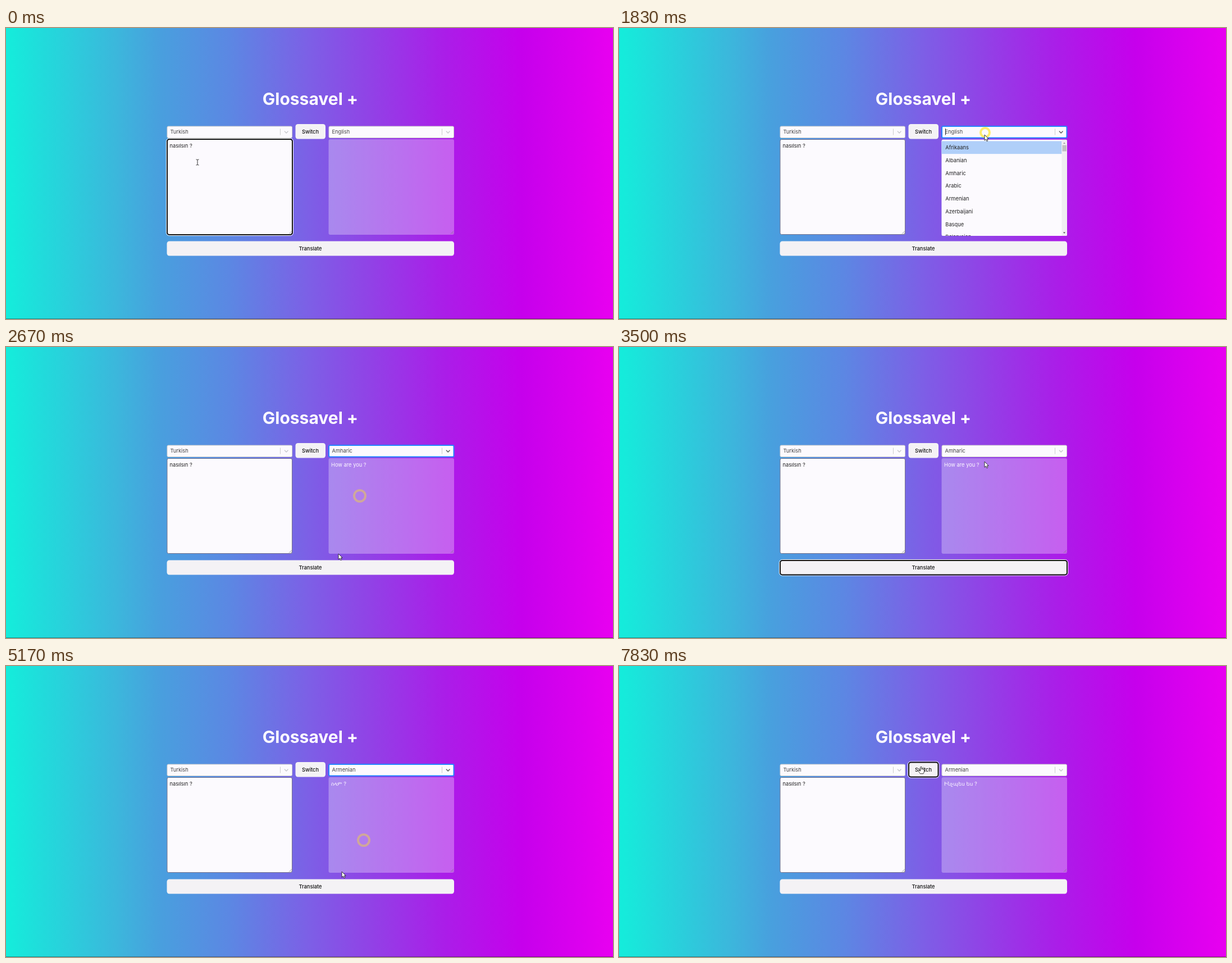
An HTML page that plays this animation: 1081 by 518 pixels, repeating every 8 s.

```html
<!DOCTYPE html>
<html lang="en">
<head>
<meta charset="utf-8">
<title>Translator</title>
<style>
html, body { margin: 0; width: 100%; height: 100%; overflow: hidden; background: #7d5fe6; }
svg { display: block; width: 1081px; height: 518px; }
text { font: 9.3px Inter, "Noto Sans", "DejaVu Sans", sans-serif; fill: #222; }
.title { font-size: 30px; font-weight: 700; fill: #fdfaff; text-anchor: middle; }
.value { fill: #444; }
.label { font-weight: 500; fill: #111; text-anchor: middle; }
.paper { fill: #fcfafe; }
.button { fill: #f4f2f5; }
.select { stroke: #ccc; }
.select.on { stroke: #2684ff; stroke-width: 2; }
.chevron { fill: none; stroke: #c8c8cc; stroke-width: 1.4; stroke-linecap: round; stroke-linejoin: round; }
.chevron.on { stroke: #555; }
.grip { stroke: #777; stroke-width: .7; }
.halo { fill: none; stroke: #fff; }
.ring { fill: none; stroke: #111; stroke-width: 2; }
</style>
</head>
<body>
<svg viewBox="0 0 1081 518">
  <defs>
    <linearGradient id="sky">
      <stop offset="0" stop-color="#14eddb"/>
      <stop offset=".185" stop-color="#3cb6dc"/>
      <stop offset=".25" stop-color="#48a0de"/>
      <stop offset=".37" stop-color="#5c87e3"/>
      <stop offset=".5" stop-color="#7d5fe6"/>
      <stop offset=".6" stop-color="#9142e6"/>
      <stop offset=".72" stop-color="#aa1ee8"/>
      <stop offset=".85" stop-color="#c600ec"/>
      <stop offset="1" stop-color="#e800f0"/>
    </linearGradient>
    <clipPath id="clip"><rect x="574.5" y="199" width="223.5" height="171" rx="2.5"/></clipPath>
  </defs>
  <rect width="1081" height="518" fill="url(#sky)"/>
  <rect y="517" width="1081" height="1" opacity=".35"/>
  <text class="title" x="542" y="137">Glossavel +</text>

  <g id="selects"></g>

  <rect class="paper" x="287" y="198.5" width="222.5" height="169" rx="2.5" stroke="#77728a"/>
  <text x="291.5" y="213.2">nasılsın ?</text>
  <path class="grip" d="M504 366.5l5-5m-2 5l2-2"/>

  <rect x="574.5" y="198" width="223.5" height="170" rx="3" fill="#fff" opacity=".3"/>
  <path class="grip" d="M792 366.5l5-5m-2 5l2-2"/>
  <text id="result" x="579" y="213.2" style="fill:#fdf8ff"></text>

  <rect class="button" x="515.5" y="171" width="53.5" height="26.5" rx="4.5"/>
  <text class="label" x="542" y="187.7">Switch</text>
  <rect class="button" x="286.5" y="379.5" width="511.5" height="26" rx="4.5"/>
  <text class="label" x="542" y="395.6">Translate</text>

  <g id="focus">
    <rect class="halo" rx="5"/>
    <rect class="ring" rx="4"/>
  </g>

  <g id="menu" clip-path="url(#clip)">
    <rect class="paper" x="574" y="199" width="225" height="171"/>
    <rect id="chosen" x="574" width="214.5" height="22.75" fill="#2c80f4"/>
    <rect id="hover" x="574" width="214.5" height="22.75" fill="#b0cff9"/>
    <g id="rows"></g>
    <rect x="788.5" y="199" width="10" height="171" fill="#f0eef2"/>
    <rect x="789.5" y="208.5" width="7.5" height="11" fill="#c1c0c3"/>
    <path d="M791 206l2-2.4 2 2.4z" fill="#999"/>
    <path d="M791 363.4l2 2.4 2-2.4z" fill="#444"/>
  </g>

  <circle id="pulse" stroke="#ffe61e" stroke-width="4"/>

  <g id="cursor" stroke-linejoin="round">
    <path id="beam" d="M-2.5-5Q0-5 0-4Q0-5 2.5-5M0-4V4M-2.5 5Q0 5 0 4Q0 5 2.5 5" fill="none" stroke="#333"/>
    <path id="arrow" d="M0 0V10.2L2.4 8L4 11.6L5.8 10.8L4.2 7.3H7.2Z" fill="#fff" stroke="#222" stroke-width=".9"/>
    <path id="hand" d="M-1.2 8V1Q0-.7 1.2 1V5L1.3 4Q2.5 3 3.4 4.3V5.4L3.6 4.7Q4.7 4.2 5.4 5.4V9Q5.2 11 4 12.7H-1.6Q-3 10.7-4.6 8.3Q-4.8 6.3-3 7Z" fill="#fff" stroke="#222" stroke-width=".9"/>
  </g>
</svg>
<script>
const $ = id => document.getElementById(id);
const LOOP = 8000, TICK = 1000 / 6;
const ROW = 22.75, TOP = 201.4;
const LANGS = ['Afrikaans', 'Albanian', 'Amharic', 'Arabic', 'Armenian', 'Azerbaijani', 'Basque', 'Belarusian'];

const selectBox = (x, value, id) => `
  <rect id="${id}Box" class="paper select" x="${x + .5}" y="175" width="222.5" height="20.5" rx="2"/>
  <text id="${id}Value" class="value" x="${x + 6}" y="188.2">${value}</text>
  <path d="M${x + 202} 179.5v11" stroke="#ccc"/>
  <path id="${id}Chevron" class="chevron" d="M${x + 209.8} 184l2.9 2.9l2.9-2.9"/>`;
$('selects').innerHTML = selectBox(286.5, 'Turkish', 'from') + selectBox(574.5, 'English', 'to') +
  '<path id="caret" d="M581.5 179v11.5" stroke="#222"/>';
$('rows').innerHTML = LANGS.map((name, i) =>
  `<text x="581.3" y="${TOP + ROW * i + 14.6}">${name}</text>`).join('');

// Each entry starts at the tick given first.
const focusLog = [[0, 'area'], [4, 'send'], [10, 'to'], [17, 'send'], [27, 'to'], [33, 'send'], [46, 'swap']];
const targetLog = [[0, 'English'], [15, 'Amharic'], [30, 'Armenian']];
const resultLog = [[0, ''], [7, 'How are you ?'], [23, 'ስላም ?'], [40, 'Ինչպես ես ?']];
const menuLog = [[0, false], [10, true], [15, false], [27, true], [30, false]];
const clicks = [[-9, 0, 0], [4, 540, 393], [10, 652, 186], [14, 630, 265], [17, 575, 391],
  [27, 653, 186], [29, 637, 310], [33, 560, 391]];
const path = [[0, 341, 239], [1, 352, 262], [3, 480, 385], [4, 540, 393], [6, 552, 392], [8, 594, 342],
  [10, 652, 188], [11, 651, 190], [13, 630, 265], [14, 630, 266], [16, 592, 368], [17, 575, 391],
  [19, 576, 390], [21, 651, 204], [22, 652, 199], [27, 653, 188], [28, 648, 236], [29, 637, 309],
  [30, 630, 322], [31, 598, 366], [32, 570, 389], [33, 560, 392], [35, 560, 392], [36, 560, 399],
  [37, 560, 399], [39, 556, 350], [42, 541, 205], [44, 538, 179], [48, 538, 179]];

const frames = {
  area: [287, 198, 223, 170],
  send: [287, 380, 511, 25.5],
  swap: [516, 171.5, 52.5, 26]
};

const latest = (log, k) => log.filter(e => e[0] <= k).pop();
const show = (id, on) => $(id).style.display = on ? '' : 'none';
const attrs = (el, values) => { for (const n in values) el.setAttribute(n, values[n]); };
const inside = (x, y, [l, t, w, h]) => x >= l && x <= l + w && y >= t && y <= t + h;

function pointer(k) {
  const a = latest(path, k), b = path.find(p => p[0] > k) || a;
  const u = a === b ? 0 : (k - a[0]) / (b[0] - a[0]);
  return [a[1] + (b[1] - a[1]) * u, a[2] + (b[2] - a[2]) * u];
}

function drawFocus(name) {
  const box = frames[name];
  show('focus', box);
  if (box) [...$('focus').children].forEach((el, i) => {
    const grow = i ? 0 : 1.5;
    attrs(el, { x: box[0] - grow, y: box[1] - grow, width: box[2] + 2 * grow, height: box[3] + 2 * grow });
  });
  const on = name === 'to';
  $('toBox').classList.toggle('on', on);
  $('toChevron').classList.toggle('on', on);
}

function drawMenu(open, target, x, y) {
  show('menu', open);
  show('caret', open);
  const chosen = LANGS.indexOf(target);
  const over = inside(x, y, [575, TOP, 213, 168]) ? Math.floor((y - TOP) / ROW) : Math.max(chosen, 0);
  show('chosen', chosen >= 0);
  show('hover', over !== chosen);
  attrs($('chosen'), { y: TOP + chosen * ROW });
  attrs($('hover'), { y: TOP + over * ROW });
}

function drawPulse(k) {
  const [start, cx, cy] = latest(clicks, k), age = k - start;
  show('pulse', age < 4);
  attrs($('pulse'), {
    cx, cy,
    r: age ? 6 + 2 * age : 4.5,
    fill: age ? 'none' : '#ffe61e',
    opacity: [.95, .65, .4, .15][age] || 0
  });
}

function drawCursor(x, y) {
  const shape = inside(x, y, frames.area) ? 'beam'
    : inside(x, y, frames.send) || inside(x, y, frames.swap) ? 'hand' : 'arrow';
  for (const s of ['beam', 'arrow', 'hand']) show(s, s === shape);
  attrs($('cursor'), { transform: `translate(${x} ${y})` });
}

let last = -1;
function draw() {
  const k = Math.floor((performance.now() % LOOP + 3.4) / TICK) % 48;
  if (k !== last) {
    last = k;
    const [x, y] = pointer(k), target = latest(targetLog, k)[1];
    $('toValue').textContent = target;
    $('result').textContent = latest(resultLog, k)[1];
    drawFocus(latest(focusLog, k)[1]);
    drawMenu(latest(menuLog, k)[1], target, x, y);
    drawPulse(k);
    drawCursor(x, y);
  }
  requestAnimationFrame(draw);
}
draw();
</script>
</body>
</html>
```
